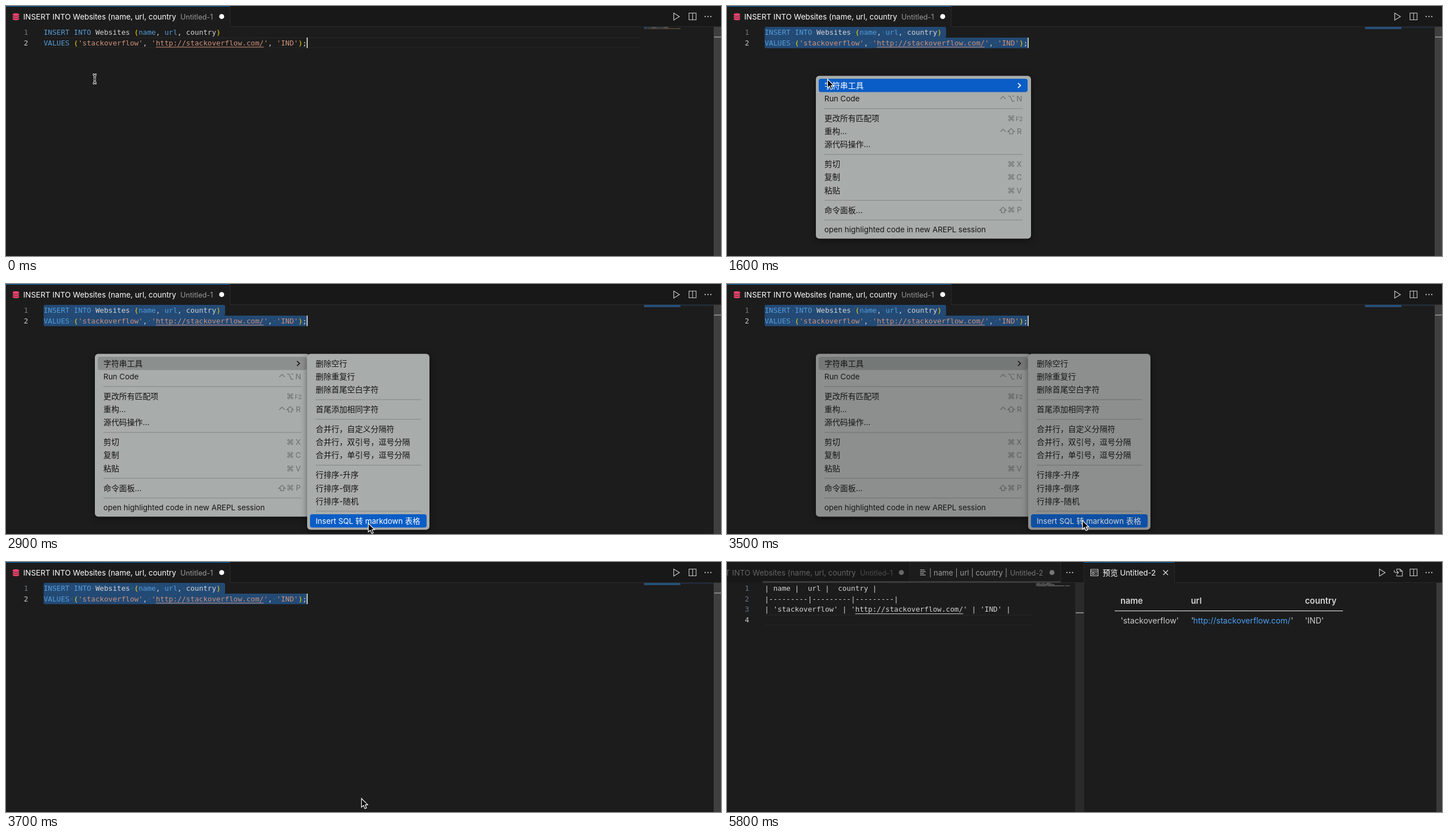
Recreate the animation shown at these times as an HTML page with a canvas. Size 1263 px wide and 443 px high, loop 6000 ms.

```html
<!DOCTYPE html>
<html lang="en">
<head>
<meta charset="utf-8">
<title>SQL insert to markdown table</title>
<style>
html, body { margin: 0; width: 100%; height: 100%; overflow: hidden; background: #1c1c1c; }
canvas { display: block; }
</style>
</head>
<body>
<canvas id="stage" width="1263" height="443"></canvas>
<script>
const c = document.getElementById('stage').getContext('2d');
const W = 1263, H = 443, LOOP = 6000, STEP = 100;
const UI = 'Inter, "Noto Sans CJK SC", "Noto Sans CJK", sans-serif';
const MONO = '"DejaVu Sans Mono", monospace';
const BG = '#1c1c1c', BAR = '#181818', EDGE = '#2a2a2a', TEXT = '#d4d4d4';
const BLUE = '#569cd6', GOLD = '#ffd700', STR = '#ce9178', ACCENT = '#0070c8';
const CODE_X = 66.5, CHAR = 7.622, LINE = 18.9, CODE_SIZE = 12.66;
const ACTIVE_ITEM = '#0a5dc6', PARENT_ITEM = '#8b8f8e';

const URL_TEXT = 'http://stackoverflow.com/';
const SQL = [
  [['INSERT INTO', BLUE], [' Websites ', TEXT], ['(', GOLD], ['name', BLUE], [', ', TEXT],
   ['url', BLUE], [', country', TEXT], [')', GOLD]],
  [['VALUES', BLUE], [' ', TEXT], ['(', GOLD], ["'stackoverflow'", STR], [', ', TEXT],
   [`'${URL_TEXT}'`, STR], [', ', TEXT], ["'IND'", STR], [')', GOLD], [';', TEXT]]
];
const TABLE = [
  '| name |  url |  country |',
  '|---------|---------|---------|',
  `| 'stackoverflow' | '${URL_TEXT}' | 'IND' |`
].map(s => [[s, TEXT]]);

// Menu entries: null is a separator; the second value holds shortcut keys.
const MENU = [['字符串工具'], ['Run Code', '⌃⌥N'], null, ['更改所有匹配项', '⌘2'], ['重构...', '⌃⇧R'],
  ['源代码操作...'], null, ['剪切', '⌘X'], ['复制', '⌘C'], ['粘贴', '⌘V'], null,
  ['命令面板...', '⇧⌘P'], null, ['open highlighted code in new AREPL session']];
const SUBMENU = [['删除空行'], ['删除重复行'], ['删除首尾空白字符'], null, ['首尾添加相同字符'], null,
  ['合并行，自定义分隔符'], ['合并行，双引号，逗号分隔'], ['合并行，单引号，逗号分隔'], null,
  ['行排序-升序'], ['行排序-倒序'], ['行排序-随机'], null, ['Insert SQL 转 markdown 表格']];
const KEY_SHAPES = {
  '⌃': 'M-4.8 .8L0 -4L4.8 .8',
  '⌥': 'M-5.5 -4.300h3.500L2 4.500h3.800M1.500 -4.300h4.300',
  '⇧': 'M0 -5L5.800 .6H2.900V4.600H-2.900V.6H-5.800Z'
};

// Pointer stops: time, x, y
const PATH = [[1300, 157, 129], [1500, 157, 129], [2200, 529, 143], [2500, 566, 168],
  [2900, 640, 424], [3300, 628, 419], [LOOP, 628, 419]];

function rect(x, y, w, h, color) {
  c.fillStyle = color;
  c.fillRect(x, y, w, h);
}
function round(x, y, w, h, r, color) {
  c.fillStyle = color;
  c.beginPath();
  c.roundRect(x, y, w, h, r);
  c.fill();
}
function dot(x, y, r, color) {
  c.fillStyle = color;
  c.beginPath();
  c.arc(x, y, r, 0, 7);
  c.fill();
}
function text(s, x, y, color, size = 13.45, font = UI, weight = 400, align = 'left') {
  c.font = `${weight} ${size}px ${font}`;
  c.textAlign = align;
  c.fillStyle = color;
  c.fillText(s, x, y);
}
function stroke(d, color, width = 1.1, x = 0, y = 0) {
  c.save();
  c.translate(x, y);
  c.strokeStyle = color;
  c.lineWidth = width;
  c.stroke(new Path2D(d));
  c.restore();
}

function codeLine(tokens, row) {
  let x = CODE_X;
  for (const [s, color] of tokens) {
    text(s, x, 50.6 + row * LINE, color, CODE_SIZE, MONO);
    x += s.length * CHAR;
  }
}
function lineNumbers(count, active) {
  for (let i = 1; i <= count; i++)
    text(i, 39, 50.6 + (i - 1) * LINE, i === active ? '#cccccc' : '#6e7681', CODE_SIZE, MONO, 400, 'right');
}
function currentLine(row, right) {
  const y = 37 + row * LINE;
  rect(67, y, right - 67, 1, '#272727');
  rect(67, y + 17.5, right - 67, 1, '#272727');
}
function underline(row, col, color) {
  rect(CODE_X + col * CHAR, 53.4 + row * LINE, URL_TEXT.length * CHAR, 1, color);
}
function minimap(x, lines) {
  c.globalAlpha = 0.5;
  lines.forEach((tokens, row) => {
    let col = 0;
    for (const [s, color] of tokens)
      for (const ch of s) {
        if (ch !== ' ') rect(x + col * 1.055, 37.4 + row * 2.1, 1, 1.3, color);
        col++;
      }
  });
  c.globalAlpha = 1;
}
function scrollbar(x, w, color, markY) {
  rect(x, 37, w, H - 37, color);
  if (markY) rect(x + 1, markY, w - 1, 2, '#858585');
}

function dbIcon(x, color) {
  for (let i = 2; i >= 0; i--) {
    const y = 14.6 + i * 3.6;
    c.fillStyle = color;
    c.strokeStyle = BG;
    c.lineWidth = 0.8;
    c.beginPath();
    c.ellipse(x, y + 1.6, 5.9, 2.1, 0, 0, Math.PI);
    c.ellipse(x, y, 5.9, 2.1, 0, Math.PI, 2 * Math.PI);
    c.closePath();
    c.fill();
    c.stroke();
  }
}
const playIcon = x => stroke('M-4.500 12.500V25L5.500 18.800Z', '#cccccc', 1.2, x);
const splitIcon = x => stroke('M-6 12.500h12.500v12h-12.500zM.3 12.500v12', '#cccccc', 1.1, x);
function dots(x) {
  for (const d of [-5, 0, 5]) dot(x + d, 18.7, 1.15, '#cccccc');
}
function openSourceIcon() {
  stroke('M1183 16v-3.500h6l4 4v8.500h-10v-3M1189 12.500v4h4M1178.500 14.500v1.500q0 2.500 2.500 2.500h5M1183.500 16l2.500 2.500l-2.500 2.500', '#cccccc');
}
function editorActions() {
  playIcon(1184);
  splitIcon(1212.5);
  dots(1240);
}

function sqlTab(x, active) {
  rect(x, 0, 396, 37, active ? BG : BAR);
  if (active) {
    rect(x, 0, 396, 1, ACCENT);
    dbIcon(x + 17.5, '#f0446f');
  }
  text('INSERT INTO Websites (name, url, country', x + 30.5, 23.6, active ? '#ffffff' : '#646464');
  text('Untitled-1', x + 308, 23.6, active ? '#9a9a9a' : '#4c4c4c', 12.7);
  dot(x + 381, 18.7, 4.4, active ? '#ffffff' : '#686868');
  rect(x + 395.5, 0, 1, 37, EDGE);
}
function tableTab(x, active) {
  rect(x, 0, 267, 37, BG);
  if (active) rect(x, 0, 267, 1, ACCENT);
  const color = active ? '#ffffff' : '#9d9d9d';
  stroke('M18 14h8M18 17h10M18 20h7M18 23h10', '#cccccc', 1.1, x);
  text('| name | url | country |', x + 34, 23.6, color, 13.2);
  text('Untitled-2', x + 177, 23.6, active ? '#9a9a9a' : '#757575', 12.4);
  dot(x + 251, 18.7, 4.4, active ? '#ffffff' : '#777777');
  rect(x + 266, 0, 1, 37, EDGE);
}
function background() {
  rect(0, 0, W, H, BG);
  rect(0, 0, W, 36, BAR);
  rect(0, 36, W, 1, EDGE);
}

function sqlEditor(t) {
  const selected = t >= 500;
  background();
  sqlTab(0, true);
  editorActions();
  if (selected) {
    round(66.5, 37, 320.5, 19, [3, 3, 3, 0], '#234a75');
    round(66.5, 56, 465.5, 18.7, [0, 3, 3, 3], '#234a75');
    SQL.forEach((tokens, row) => {
      [...tokens.map(k => k[0]).join('')].forEach((ch, i) => {
        if (ch === ' ') dot(CODE_X + (i + 0.5) * CHAR, 46.5 + row * LINE, 0.8, '#58708c');
      });
    });
  } else currentLine(1, 1123);
  lineNumbers(2, 2);
  SQL.forEach(codeLine);
  underline(1, 26, STR);
  minimap(1127, SQL);
  if (selected) {
    rect(1127, 37, 122, 2, '#1e2a3c');
    rect(1127, 37, 64, 4, '#264f78');
  }
  scrollbar(1250, 13, '#3f3f3f', 54);
  const caretOn = t < 100 || t >= 500 && t < 1000 || t >= 1300 && t < 2000 ||
    t >= 2500 && t < 3000 || t >= 3500;
  if (caretOn) rect(531, 56, 2, 18.5, '#c4c4c0');
}

function tableEditor(t) {
  const split = t >= 4000;
  background();
  sqlTab(split ? -73 : 0, false);
  tableTab(split ? 323 : 396, !split);
  lineNumbers(4, 4);
  currentLine(3, split ? 541 : 1123);
  TABLE.forEach(codeLine);
  if (t >= 5400) underline(2, 21, TEXT);
  minimap(split ? 546 : 1127, TABLE);
  if (!split) {
    rect(67, 94, 2, 18.5, '#c4c4c0');
    scrollbar(1250, 13, '#3f3f3f', 89);
    editorActions();
    return;
  }
  if (t >= 4100) rect(63, 34, 526, 3, '#3c3c3c');
  dots(605.5);
  scrollbar(615, 15, t < 5800 ? '#434343' : '#2a2a2a', 89);
  preview(t);
}

function preview(t) {
  rect(630, 0, 160, 37, BG);
  rect(630, 0, 160, 1, ACCENT);
  rect(630, 0, 1, H, EDGE);
  rect(790, 0, 1, 37, EDGE);
  stroke('M642.500 13h13v11.500h-13zM642.500 16h13M645 18.500h3.500v3.500h-3.500zM650.500 18.500h3M650.500 21.500h3', '#cccccc');
  text('预览 Untitled-2', 663.5, 23.6, '#ffffff');
  stroke('M770.500 14.500l8.500 8.500M779 14.500l-8.500 8.500', '#e0e0e0', 1.2);
  playIcon(1157);
  openSourceIcon();
  splitIcon(1212.5);
  dots(1240);
  if (t < 4300) return;
  const head = (s, x) => text(s, x, 74, TEXT, 14.8, UI, 600);
  const cell = (s, x, color = '#cccccc') => text(s, x, 109.2, color, 14.2);
  head('name', 695);
  head('url', 819.5);
  head('country', 1021);
  rect(685, 86, 403, 1.2, '#d8d8d8');
  cell("'stackoverflow'", 695.5);
  cell("'", 820);
  cell(URL_TEXT, 823.5, '#4a9ff5');
  cell("'", 996);
  cell("'IND'", 1021);
  scrollbar(1253, 10, '#3a3a3a');
}

function panel(x, w, h) {
  c.save();
  c.shadowColor = 'rgba(0,0,0,.45)';
  c.shadowBlur = 12;
  c.shadowOffsetY = 3;
  round(x, 123.7, w, h, 6, '#a8acab');
  c.restore();
}
function keys(s, y) {
  const color = '#6a6e6d';
  [...s].reverse().forEach((key, i) => {
    const x = 516.2 - i * 14.3;
    if (KEY_SHAPES[key]) stroke(KEY_SHAPES[key], color, 1.2, x, y);
    else if (key === '2') text('F2', x, y + 4.8, color, 10.5, UI, 400, 'center');
    else text(key, x, y + 4.8, color, 13.45, key === '⌘' ? '"DejaVu Sans", sans-serif' : UI, 400, 'center');
  });
}
// Draws the entries and highlights the one under pointerY.
function entries(list, x, itemWidth, lineWidth, pointerY, highlight) {
  let y = 140.8;
  for (const entry of list) {
    if (!entry) {
      rect(x + 15, y - 6.3, lineWidth, 1.3, '#8a8e8d');
      y += 11.6;
      continue;
    }
    const [label, shortcut] = entry;
    const hit = Math.abs(pointerY - y) <= 11.62;
    if (hit) round(x + 5, y - 11.7, itemWidth, 23.4, 4, highlight);
    const color = hit && highlight === ACTIVE_ITEM ? '#ffffff' : '#141414';
    text(label, x + 15, y + 4.9, color, /^[a-z]/i.test(label) ? 13.45 : 13.9);
    if (shortcut) keys(shortcut, y);
    if (entry === MENU[0]) stroke('M514 -4.300l4.500 4.300l-4.500 4.300', color, 1.7, 0, y);
    y += 23.25;
  }
}
function menus(t, pointer) {
  const inSubmenu = pointer.x > 536;
  panel(157, 380, 288.5);
  entries(MENU, 157, 369, 350, t >= 1600 ? 140.8 : -99, inSubmenu ? PARENT_ITEM : ACTIVE_ITEM);
  if (t >= 1800) {
    panel(532, 216, 311.8);
    entries(SUBMENU, 532, 206, 186, inSubmenu ? pointer.y : -99, ACTIVE_ITEM);
  }
  // Closing: both panels sink into the editor background together.
  if (t >= 3500) {
    c.globalAlpha = t < 3600 ? 0.2 : 0.7;
    c.fillStyle = BG;
    c.beginPath();
    c.roundRect(157, 123.7, 380, 288.5, 6);
    c.roundRect(532, 123.7, 216, 311.8, 6);
    c.fill();
    c.globalAlpha = 1;
  }
}

function pointerAt(t) {
  const i = PATH.findIndex(p => p[0] > t);
  const [t0, x0, y0] = PATH[i - 1], [t1, x1, y1] = PATH[i];
  const u = (t - t0) / (t1 - t0), k = u * u * (3 - 2 * u);
  return { x: x0 + (x1 - x0) * k, y: y0 + (y1 - y0) * k };
}
function arrow({ x, y }) {
  const p = new Path2D('M0 0V15.500L3.600 12.300L6 18L8.800 16.900L6.400 11.300H11Z');
  c.save();
  c.translate(x, y);
  c.fillStyle = '#000';
  c.fill(p);
  c.strokeStyle = '#fff';
  c.lineWidth = 1.2;
  c.stroke(p);
  c.restore();
}
function iBeam() {
  const d = 'M153.500 121.500q3 0 3.300 2.500v10.500q-.3 2.500 -3.300 2.500M160 121.500q-3 0 -3.300 2.500v10.500q.3 2.500 3.300 2.500M154.800 129.500h4';
  stroke(d, '#ffffff', 3.3);
  stroke(d, '#000000', 1.2);
}

function draw(t) {
  if (t < 3800) sqlEditor(t);
  else tableEditor(t);
  if (t < 1300) return iBeam();
  const pointer = pointerAt(t);
  if (t < 3700) menus(t, pointer);
  if (t < 5400) arrow(pointer);
}
function tick() {
  draw(Math.floor(performance.now() % LOOP / STEP) * STEP);
  requestAnimationFrame(tick);
}
tick();
</script>
</body>
</html>
```
